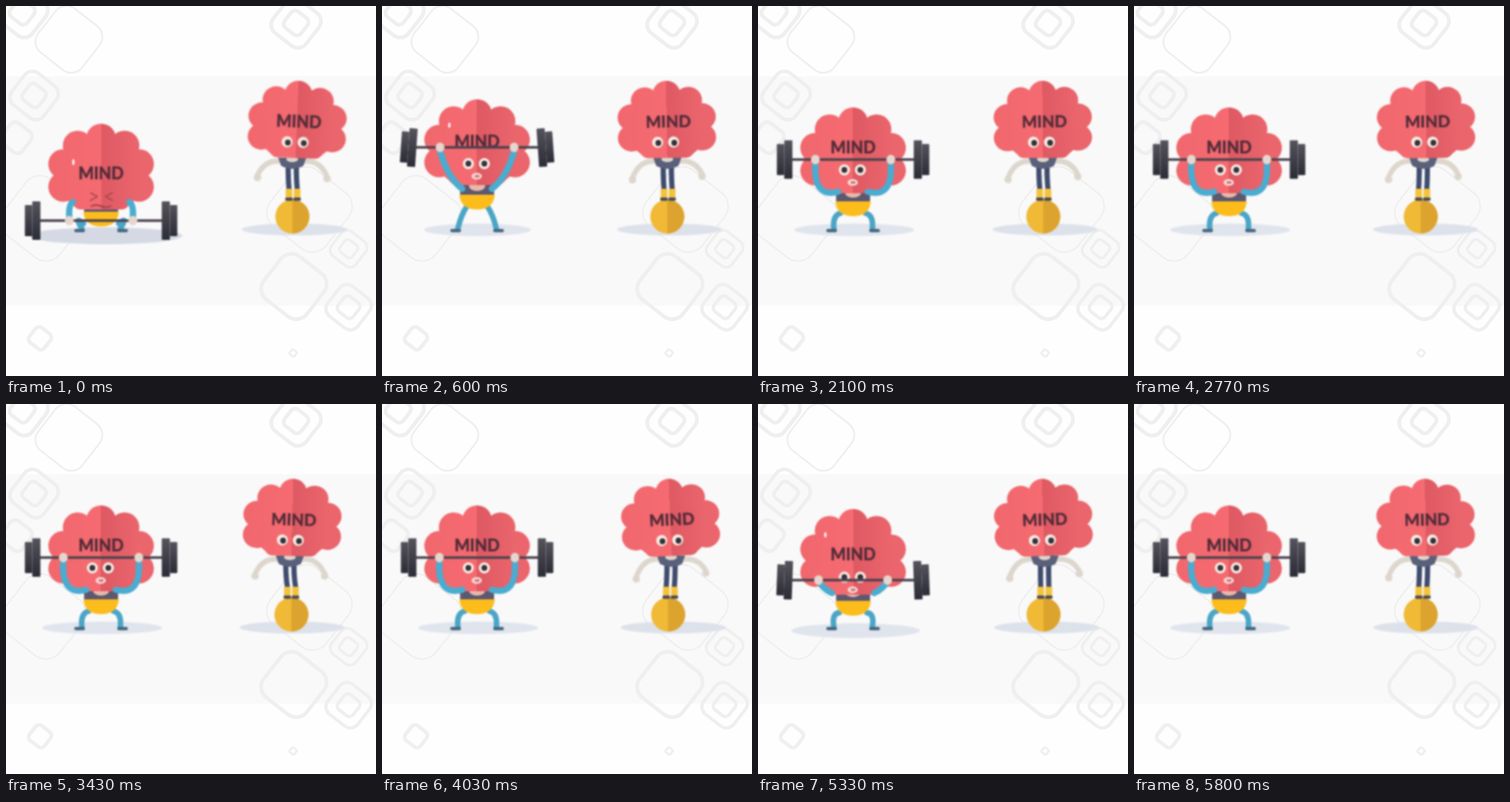
Animation of 500x500 px, one loop 5830 ms. Source, as an HTML page:

```html
<!DOCTYPE html>
<html lang="en">
<head>
<meta charset="utf-8">
<title>Mind workout</title>
<style>
  html, body { margin: 0; width: 100%; height: 100%; overflow: hidden; background: #fefefe; }
  svg { display: block; width: 100vw; height: 100vh; }
  #cast { filter: blur(.9px); }
  #decor { filter: blur(.5px); }
  text { font: bold 22px Lato, "Open Sans", sans-serif; fill: #542c3a; stroke: #542c3a; stroke-width: .6; text-anchor: middle; }
</style>
</head>
<body>
<svg viewBox="0 0 500 500">
  <defs>
    <linearGradient id="brain" gradientUnits="userSpaceOnUse" x1="-74" x2="74" y1="0" y2="0">
      <stop offset="0" stop-color="#f0676d"/>
      <stop offset=".5" stop-color="#f56b71"/>
      <stop offset=".5" stop-color="#de5962"/>
      <stop offset=".85" stop-color="#ea656c"/>
    </linearGradient>
    <linearGradient id="plate" x2="0" y2="1">
      <stop offset="0" stop-color="#55535c"/>
      <stop offset="1" stop-color="#2b2c36"/>
    </linearGradient>
  </defs>
  <rect y="95" width="500" height="310" fill="#f9f9f9"/>
  <g id="decor" fill="none" stroke="#efefef"></g>
  <g id="cast"></g>
</svg>
<script>
const LOOP = 5830, LIFT = 4900, SWAY = 1540;
const $ = id => document.getElementById(id);

// ---- shape helpers ----
const line = (d, color, width) =>
  `<path d="${d}" fill="none" stroke="${color}" stroke-width="${width}" stroke-linecap="round" stroke-linejoin="round"/>`;
const oval = (x, y, rx, ry, fill) => `<ellipse cx="${x}" cy="${y}" rx="${rx}" ry="${ry}" fill="${fill}"/>`;
const box = (x, y, w, h, fill, r = 0) => `<rect x="${x}" y="${y}" width="${w}" height="${h}" rx="${r}" fill="${fill}"/>`;
const both = draw => [-1, 1].map(draw).join('');

// ---- faint background diamonds ----
function diamond(x, y, r, width) {
  const s = r * 1.6;
  return `<rect x="${-s / 2}" y="${-s / 2}" width="${s}" height="${s}" rx="${s / 4}"
    transform="translate(${x} ${y}) rotate(38)" stroke-width="${width}"/>`;
}
const nested = (x, y, r) => diamond(x, y, r, r / 7) + diamond(x, y, r / 2, r / 7);
$('decor').innerHTML =
  diamond(85, 45, 47, 2.5) + diamond(50, 287, 60, 2) + diamond(410, 275, 60, 2) +
  diamond(389, 379, 46, 5) + diamond(14, 178, 22, 5) + diamond(46, 449, 16, 5) + diamond(388, 469, 5, 3) +
  nested(22, 8, 36) + nested(38, 121, 34) + nested(392, 23, 35) + nested(463, 407, 32) + nested(463, 328, 26);

// ---- shared parts ----
function brain(x, y, sx = 1, sy = 1) {
  let lobes = '';
  for (let k = -3; k <= 3; k++) {
    const a = k * Math.PI / 5;
    lobes += `<circle cx="${54 * Math.sin(a)}" cy="${70 - 50 * Math.cos(a)}" r="20"/>`;
  }
  return `<g transform="translate(${x} ${y}) scale(${sx} ${sy})" fill="url(#brain)">${lobes}
    <path d="M-50 38L-30 28H30L50 38L54 98Q42 105 36 112Q33 116 27 116H-27Q-33 116-36 112Q-42 105-54 98Z"/></g>`;
}
const word = (x, y) => `<text x="${x}" y="${y + 8}">MIND</text>`;
const eyes = (x, y, look) => both(s =>
  oval(x + s * 10.8, y, 7.5, 7.5, '#f6ede4') + oval(x + s * 10.8 + look, y + look, 3.9, 4.1, '#373039'));

function ramp(t, from, to) {
  const u = Math.min(1, Math.max(0, (t - from) / (to - from)));
  return u * u * (3 - 2 * u);
}

// Drops into a squat, strains, thrusts the bar up, then settles with bent arms.
function lifter(t) {
  const u = (t + 450) % LIFT;
  const squat = ramp(u, 0, 250) - ramp(u, 700, 1050);
  const reach = ramp(u, 700, 1050) - ramp(u, 1050, 1350);
  const pose = (held, bySquat, byReach) => held + bySquat * squat + byReach * reach;

  const cx = 128.5, straining = squat > .5;
  const bar = pose(207.5, 82.5, -16.5), top = pose(137, 22, -11);
  const belt = pose(264, 14, -9), hip = belt + 16, chest = belt - 12;
  const eyeY = top + pose(84.5, 14, 2.5), handX = pose(51, -8, -1);

  const shadow = oval(pose(130, 5, -1), pose(302.5, 8, 0), pose(81, 22, -9), pose(8.5, 3, 0),
    straining ? '#d4d9e4' : '#e0e4ed');
  const legs = both(s =>
    line(`M${cx + s * pose(17, 7, -3)} ${hip}Q${cx + s * pose(28, 9, -6)} 283 ${cx + s * 26} 301`, '#4aa5c6', 7.5) +
    line(`M${cx + s * 24} 303.5H${cx + s * 34}`, '#46677f', 4.5));
  const body = box(cx - 23, belt - 15, 46, 17, '#5c5870', 4) + oval(cx, chest, 11, 7, '#e9b8a9') +
    `<path d="M${cx - 24} ${belt}h48q-2 20-24 20t-24-20z" fill="#fbbc1c"/>`;
  const face = straining
    ? line(`M${cx - 14} ${eyeY - 5}l9 5l-9 5M${cx + 15} ${eyeY - 5}l-9 5l9 5`, '#a84550', 2) +
      line(`M${cx - 13} ${eyeY + 13}q6-3 13 0t13 0`, '#a84550', 2.5)
    : eyes(cx - 1, eyeY, 0) + oval(cx - .5, eyeY + 17, 7, 4.5, '#f7d9d3') + oval(cx, eyeY + 17, 3.5, 1.8, '#c9737a');
  const sweat = (straining ? oval(91, top + 52, 1.5, 4, '#fff') : '') +
    (reach > .5 ? oval(91, top + 35, 1.5, 3.5, '#fff') : '');
  const arms = both(s =>
    line(`M${cx + s * pose(20, 18, 0)} ${pose(251, 14, -4)}Q${cx + s * pose(54, -10, -14)} ${pose(260, 8, -28)}
      ${cx + s * handX} ${bar + pose(5, -10, 0)}`, '#4aacd0', 8.5));
  const weights = both(s => `<g transform="translate(${cx} ${bar}) scale(${s} 1) rotate(${-4 * reach} 92 0)">
    ${box(82, -26, 11, 52, 'url(#plate)', 1) + box(93, -21, 10, 42, 'url(#plate)', 1)}</g>`);
  const hands = both(s => oval(cx + s * handX, bar, 6, 6.5, '#e6d6cd'));

  return shadow + legs + body + brain(cx, top) + word(cx, top + pose(54, 13, 3)) + face + sweat + arms +
    line(`M46 ${bar}H211`, '#4c4350', 3.5) + weights + hands;
}

// The head circles: sideways sway and tilt run a quarter turn apart.
function balancer(t) {
  const phase = Math.PI / 6 - 2 * Math.PI * t / SWAY;
  const sway = 5 * Math.sin(phase), tilt = 2.5 * Math.cos(phase);
  const x = 390 + sway, top = 101, ball = 386.5 + sway / 5;
  const mid = 387.5 + .6 * sway - tilt, skin = '#dcd6cd';

  const arms = both(s => {
    const hx = mid + s * 47, hy = 231.5 + s * (tilt - 1.5);
    return line(`M${mid + s * 15} 210Q${mid + s * 37} 207 ${hx} ${hy - 2}`, skin, 7) + oval(hx, hy + 1, 5, 5, skin);
  });
  const legs = both(s => {
    const hip = mid + s * 5.5, foot = (ball + mid) / 2 + 1 + s * 5.5;
    return line(`M${hip} 217Q${hip} 234 ${foot} 246`, '#3f4c6e', 7) +
      box(foot - 4.5, 247, 9, 12, '#f4c33c') + line(`M${foot - 3} 261H${foot + 3}`, '#4b4c59', 4.5);
  });
  return oval(mid + 3, 302, 71, 8, '#dde1ea') +
    oval(ball, 284.5, 23, 23, '#f0b936') +
    `<path d="M${ball} 261.5a23 23 0 0 1 0 46z" fill="#dca32e"/>` +
    legs + arms +
    `<path d="M${mid - 19} 205h38l-4 11q-15 8-30 0z" fill="#5a6079"/>` + oval(mid, 207, 8, 4, skin) +
    `<g transform="rotate(${tilt} ${x} 190)">` +
    brain(x, top, .93, .9) + word(x + 2, top + 55) + eyes(x - 2, top + 83, 1) + '</g>';
}

function frame() {
  const t = performance.now() % LOOP;
  $('cast').innerHTML = lifter(t) + balancer(t);
  requestAnimationFrame(frame);
}
frame();
</script>
</body>
</html>
```
